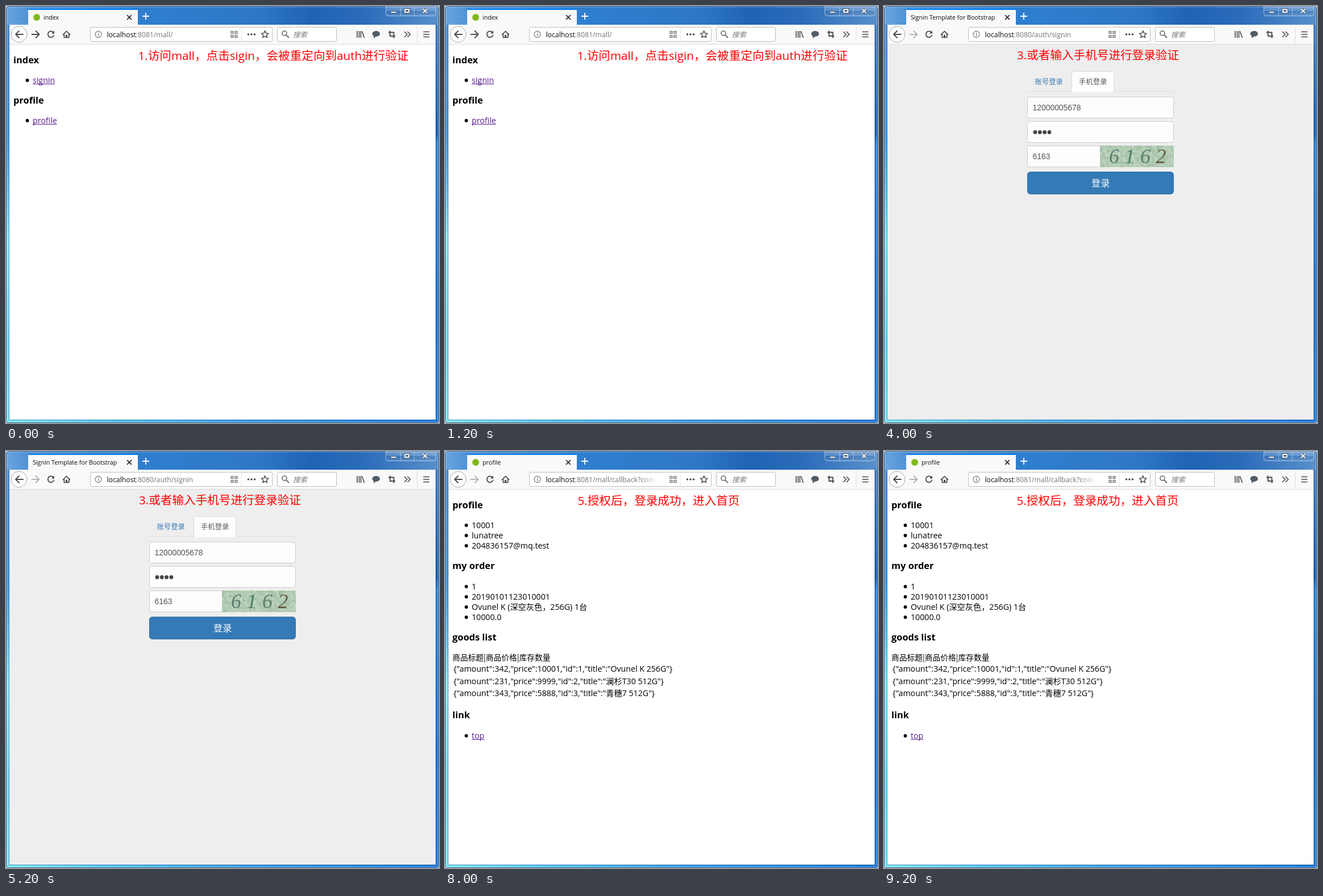
Recreate the animation shown at these times as an HTML page with a canvas. Size 762 by 735 pixels, loop 10 s.

```html
<!DOCTYPE html>
<html lang="zh-CN">
<head>
<meta charset="utf-8">
<title>Sign-in walkthrough</title>
<style>
html, body { margin: 0; width: 100%; height: 100%; overflow: hidden; }
canvas { display: block; }
</style>
</head>
<body>
<canvas id="stage" width="762" height="735"></canvas>
<script>
const W = 762, H = 735, HOLD = 2000;
const ctx = document.getElementById('stage').getContext('2d');
const CJK = "'Noto Sans CJK SC', 'Noto Sans CJK'";
const UI = `'Open Sans', ${CJK}, sans-serif`;
const HAN = `${CJK}, sans-serif`;
const ARIAL = `'Liberation Sans', Arial, ${CJK}, sans-serif`;
const INK = '#4a4a4f';

// ---------- helpers ----------
function text(s, x, y, size, color = '#000', family = UI, style = '') {
  ctx.font = `${style} ${size}px ${family}`;
  ctx.fillStyle = color;
  ctx.fillText(s, x, y);
  return ctx.measureText(s).width;
}
function rect(x, y, w, h, color) {
  ctx.fillStyle = color;
  ctx.fillRect(x, y, w, h);
}
function box(x, y, w, h, r, fill, stroke) {
  ctx.beginPath();
  ctx.roundRect(x, y, w, h, r);
  if (fill) { ctx.fillStyle = fill; ctx.fill(); }
  if (stroke) { ctx.strokeStyle = stroke; ctx.lineWidth = 1; ctx.stroke(); }
}
function disc(x, y, r, fill, stroke, lw = 1) {
  ctx.beginPath();
  ctx.arc(x, y, r, 0, Math.PI * 2);
  if (fill) { ctx.fillStyle = fill; ctx.fill(); }
  if (stroke) { ctx.strokeStyle = stroke; ctx.lineWidth = lw; ctx.stroke(); }
}
function path(d, color, lw, fill) {
  const p = new Path2D(d);
  if (fill) { ctx.fillStyle = color; ctx.fill(p); return; }
  ctx.strokeStyle = color;
  ctx.lineWidth = lw;
  ctx.stroke(p);
}
function blend(x0, y0, x1, y1, stops) {
  const g = ctx.createLinearGradient(x0, y0, x1, y1);
  stops.forEach(([at, color]) => g.addColorStop(at, color));
  return g;
}
function fadeX(from, to, color) {
  return blend(from, 0, to, 0, [[0, color], [1, color + '00']]);
}
function random(seed) {
  return () => (seed = (seed * 16807) % 2147483647) / 2147483647;
}

// ---------- window ----------
function frame() {
  rect(0, 0, W, H, '#c9d6e4');
  ctx.save();
  ctx.beginPath();
  ctx.roundRect(0, 0, W, H, [6, 6, 5, 5]);
  ctx.clip();
  rect(0, 0, W, 68, blend(0, 0, W, -60, [[0, '#6aa4de'], [.05, '#4f92d6'], [.3, '#2f7fcf'],
    [.58, '#2e77c6'], [.7, '#2063b4'], [.82, '#2b6cba'], [1, '#5c92cb']]));
  rect(0, 33, 6, H - 33, blend(0, 33, 0, H, [[0, '#4b91d8'], [.28, '#3f98e0'], [.4, '#57bdee'],
    [.54, '#83ecf8'], [.8, '#69ddf6'], [1, '#7cebf8']]));
  rect(756, 33, 6, H - 33, blend(0, 33, 0, H, [[0, '#4380c4'], [.27, '#175caf'], [.3, '#2b86dc'],
    [.7, '#1c73d2'], [1, '#2380dd']]));
  rect(0, 729, W, 6, blend(0, 0, W, 0, [[0, '#7cebf8'], [.25, '#53c3f1'], [.55, '#379eea'], [1, '#1d78d8']]));
  ctx.restore();
  box(.5, .5, W - 1, H - 1, [6, 6, 5, 5], null, '#24507f');
  box(1.5, 1.5, W - 3, H - 3, [5, 5, 4, 4], null, 'rgba(255,255,255,.4)');
  ctx.strokeStyle = 'rgba(40,90,140,.55)';
  ctx.strokeRect(5.5, 33.5, 751, 696);

  box(668.5, -4.5, 88, 22, 4, blend(0, 0, 0, 18, [[0, 'rgba(255,255,255,.28)'],
    [.5, 'rgba(255,255,255,.12)'], [.52, 'rgba(0,40,100,.1)'], [1, 'rgba(255,255,255,.15)']]),
    'rgba(215,232,250,.6)');
  rect(694, 1, 1, 16, 'rgba(215,232,250,.5)');
  rect(718, 1, 1, 16, 'rgba(215,232,250,.5)');
  box(677.5, 9.5, 9, 3, 1, '#fff', '#44566e');
  ctx.strokeStyle = '#44566e';
  ctx.lineWidth = 4;
  ctx.strokeRect(702, 6, 7, 5);
  ctx.strokeStyle = '#fff';
  ctx.lineWidth = 2;
  ctx.strokeRect(702, 6, 7, 5);
  path('M734 5 L741 12 M741 5 L734 12', '#44566e', 4);
  path('M734 5 L741 12 M741 5 L734 12', '#fff', 2);
}

function tab({ title, icon }) {
  rect(39, 5, 193, 28, '#f9f9fa');
  rect(39, 5, 193, 2, '#0a84ff');
  if (icon === 'leaf') disc(54, 20, 6, '#80b91c');
  if (icon === 'tile') box(48, 14, 12, 12, 2, '#2f80e4');
  const x = icon ? 66 : 47, size = 10.7;
  ctx.save();
  ctx.beginPath();
  ctx.rect(40, 8, 167, 24);
  ctx.clip();
  ctx.font = `${size}px ${UI}`;
  const overflows = x + ctx.measureText(title).width > 207;
  text(title, x, 23.5, size, overflows ? fadeX(186, 210, '#0c0c0d') : '#0c0c0d');
  ctx.restore();
  path('M213 16 L221 24 M221 16 L213 24', '#1c1c1e', 1.7);
  path('M246 12 V24 M240 18 H252', '#fff', 1.8);
}

function toolbar({ url, forward }) {
  rect(6, 33, 750, 34, '#f9f9fa');
  rect(6, 67, 750, 1, '#dcdcdd');
  disc(23, 50, 14, '#fdfdfd', '#a9a9ab');
  ctx.lineJoin = ctx.lineCap = 'round';
  path('M30 50 H17.5 M23 44 L17 50 L23 56', INK, 1.8);
  path('M45.5 50 H58 M52.5 44 L58.5 50 L52.5 56', forward ? INK : '#b4b4b6', 1.8);
  path('M83.3 46.4 A5.4 5.4 0 1 0 84.3 51.5', INK, 1.8);
  path('M85 43.5 V48.6 H79.8 Z', INK, 1, true);
  path('M100.5 50.3 L106.5 44.5 L112.5 50.3 M102.3 50 V55.5 H110.7 V50', INK, 1.7);
  rect(105, 51, 3, 5, INK);

  box(148.5, 37.5, 320, 25, 2, '#fff', '#bdbdbf');
  disc(162.5, 50, 5.6, null, '#6c6c70', 1.1);
  rect(162, 49, 1.3, 4, '#6c6c70');
  rect(162, 46.6, 1.3, 1.4, '#6c6c70');
  ctx.save();
  ctx.beginPath();
  ctx.rect(170, 40, 202, 20);
  ctx.clip();
  const w = text('localhost', 177.5, 55, 12.25, '#0c0c0d');
  text(url, 177.5 + w, 55, 12.25, fadeX(345, 373, '#737377'));
  ctx.restore();
  for (const x of [396, 403]) for (const y of [44.5, 51.5]) {
    ctx.strokeStyle = '#66666a';
    ctx.lineWidth = 1.2;
    ctx.strokeRect(x, y, 4, 4);
    rect(x + 1.5, y + 1.5, 1.2, 1.2, '#66666a');
  }
  rect(414, 39, 1, 22, '#e4e4e5');
  [426.5, 432, 437.5].forEach(x => disc(x, 50, 1.8, INK));
  let star = '';
  for (let i = 0; i < 10; i++) {
    const r = i % 2 ? 3 : 6.6, a = i * Math.PI / 5 - Math.PI / 2;
    star += `${i ? 'L' : 'M'}${455.7 + r * Math.cos(a)} ${50.3 + r * Math.sin(a)}`;
  }
  path(star + 'Z', INK, 1.5);

  box(477.5, 37.5, 104, 25, 2, '#fff', '#bdbdbf');
  disc(490, 48, 4, null, '#6c6c70', 1.6);
  path('M493 51.2 L497.5 55.5', '#6c6c70', 1.9);
  text('搜索', 505, 54.5, 12.4, '#77777a', HAN, 'italic');

  ctx.lineCap = 'butt';
  path('M618 44 V56 M621.5 44 V56 M624.5 44 V56 M626.5 44.5 L630.5 56', INK, 1.6);
  ctx.beginPath();
  ctx.ellipse(651.3, 49, 6.8, 5, 0, 0, Math.PI * 2);
  ctx.fillStyle = '#515c66';
  ctx.fill();
  path('M647 52 L647 57 L652 53 Z', '#515c66', 1, true);
  path('M673 46.5 H682.5 V56.5 M675.8 43.5 V53 H685', INK, 1.9);
  ctx.lineCap = 'round';
  path('M701.5 45.5 L706 50 L701.5 54.5 M707 45.5 L711.5 50 L707 54.5', INK, 1.6);
  rect(723, 36, 1, 28, '#dededf');
  path('M735 45.5 H744.5 M735 50 H744.5 M735 54.5 H744.5', INK, 1.7);
  ctx.lineCap = 'butt';
  ctx.lineJoin = 'miter';
}

// ---------- page parts ----------
const body = (s, x, y, color) => text(s, x, y, 14.2, color);
const heading = (s, y) => text(s, 13, y, 16.4, '#000', UI, 'bold');
function item(s, y) {
  disc(37.5, y - 5, 2.9, '#000');
  body(s, 47, y);
}
function link(s, y) {
  disc(37.5, y - 5, 2.9, '#000');
  const w = body(s, 47, y, '#551a8b');
  rect(47, y + 1, w, 1, '#551a8b');
}

function captcha(x, y, w, h) {
  const rnd = random(61);
  ctx.save();
  ctx.beginPath();
  ctx.rect(x, y, w, h);
  ctx.clip();
  rect(x, y, w, h, '#b3cbb3');
  for (let i = 0; i < w; i += 4) for (let j = 0; j < h; j += 4) {
    const v = rnd() * 26 - 13;
    rect(x + i, y + j, 4, 4, `rgb(${178 + v}, ${203 + v * .8}, ${180 + v})`);
  }
  for (let i = 0; i < 26; i++) {
    const a = x + rnd() * w, b = y + rnd() * h;
    path(`M${a} ${b} l${rnd() * 16 - 8} ${rnd() * 14 - 7}`, 'rgba(120,165,135,.45)', 1);
  }
  const inks = ['#5b7f6d', '#4d7d68', '#5a8069', '#625f40'];
  [...'6162'].forEach((c, i) =>
    text(c, x + 16 + i * 27.5, y + 31, 36, inks[i], "'Liberation Serif', serif", 'italic'));
  ctx.restore();
}

function form({ active, user, dots, code }) {
  rect(252, 150, 258, 1, '#dddddd');
  const [left, width] = active ? [330, 75] : [252, 76];
  box(left + .5, 115.5, width - 1, 36, [4, 4, 0, 0], '#fdfdfd', '#dddddd');
  rect(left + 1, 150, width - 2, 2, '#fdfdfd');
  ['账号登录', '手机登录'].forEach((s, i) =>
    text(s, 265.5 + i * 77.5, 137.5, 12.35, i === active ? '#555' : '#337ab7', HAN));

  box(252.5, 160.5, 257, 37, 4, '#fdfdfd', '#cccccc');
  box(252.5, 203.5, 257, 37, 4, '#fdfdfd', '#cccccc');
  box(252.5, 246.5, 128, 37, 1, '#fdfdfd', '#cccccc');
  text(user, 261.5, 184, 13.9, '#555', ARIAL);
  for (let i = 0; i < dots; i++) disc(266 + i * 8.3, 222.5, 3.4, '#444');
  if (code) text(code, 261.5, 269.5, 13.9, '#555', ARIAL);
  else text('验证码', 261.5, 270, 13.8, '#999', HAN);
  captcha(380, 246, 130, 38);
  box(252.5, 292.5, 257, 39, 5, '#337ab7', '#2e6da4');
  text('登录', 365, 318, 16.2, '#fff', HAN);
}

function radio(x, y, on) {
  disc(x, y, 5, blend(x - 4, y - 4, x + 4, y + 4, [[0, '#cfd3d6'], [1, '#fafafa']]), '#8a8d90');
  if (on) disc(x, y, 2.8, '#12496f');
}

// ---------- pages ----------
function indexPage() {
  heading('index', 101);
  link('signin', 136);
  heading('profile', 172);
  link('profile', 207);
}
function approvalPage() {
  text('OAuth Approval', 13, 115, 28.4, '#000', UI, 'bold');
  ['应用名 : client', '申请权限 :', 'scope.ALL(所有)'].forEach((s, i) => body(s, 13, 155 + i * 18));
  radio(22.5, 204);
  body('Approve', 31, 209);
  radio(100.5, 204, true);
  body('Deny', 109, 209);
  box(13.5, 214.5, 40, 17, 2, blend(0, 214, 0, 232, [[0, '#f3f3f3'], [.48, '#ebebeb'],
    [.5, '#dddddd'], [1, '#cfcfcf']]), '#707070');
  text('提交', 22, 227.5, 11.8, '#000', HAN);
}
function profilePage() {
  heading('profile', 101);
  ['10001', 'lunatree', '204836157@mq.test'].forEach((s, i) => item(s, 136 + i * 18));
  heading('my order', 208);
  ['1', '20190101123010001', 'Ovunel K (深空灰色，256G) 1台', '10000.0']
    .forEach((s, i) => item(s, 244 + i * 18));
  heading('goods list', 334);
  text('商品标题|商品价格|库存数量', 13, 369, 13.75, '#000', HAN);
  [[342, 10001, 'Ovunel K 256G'], [231, 9999, '澜杉T30 512G'], [343, 5888, '青穗7 512G']]
    .forEach(([amount, price, title], i) =>
      body(JSON.stringify({ amount, price, id: i + 1, title }), 15, Math.round(389.4 + i * 21.4)));
  heading('link', 471);
  link('top', 507);
}

const signin = { title: 'Signin Template for Bootstrap', url: ':8080/auth/signin', bg: '#eeeeee' };
const scenes = [
  { title: 'index', icon: 'leaf', url: ':8081/mall/', forward: true, page: indexPage,
    note: '1.访问mall，点击sigin，会被重定向到auth进行验证', at: [232.5, 95] },
  { ...signin, note: '2.输入账号进行登录验证', at: [234, 94],
    page: () => form({ active: 0, user: 'user', dots: 6 }) },
  { ...signin, note: '3.或者输入手机号进行登录验证', at: [234, 94],
    page: () => form({ active: 1, user: '12000005678', dots: 4, code: '6163' }) },
  { title: 'localhost:8080/auth/oauth/authorize', icon: 'tile', url: ':8080/auth/oauth/authorize',
    page: approvalPage, note: '4.选择是否授权', at: [233, 94] },
  { title: 'profile', icon: 'leaf', url: ':8081/mall/callback?code=', page: profilePage,
    note: '5.授权后，登录成功，进入首页', at: [233.5, 95] }
];

function draw(scene) {
  frame();
  tab(scene);
  toolbar(scene);
  rect(6, 68, 750, 661, scene.bg || '#fff');
  scene.page();
  text(scene.note, ...scene.at, 20.6, '#ff0000');
}

const start = performance.now();
function tick() {
  const t = Math.max(0, performance.now() - start);
  draw(scenes[Math.floor(t / HOLD) % scenes.length]);
  requestAnimationFrame(tick);
}
tick();
</script>
</body>
</html>
```
